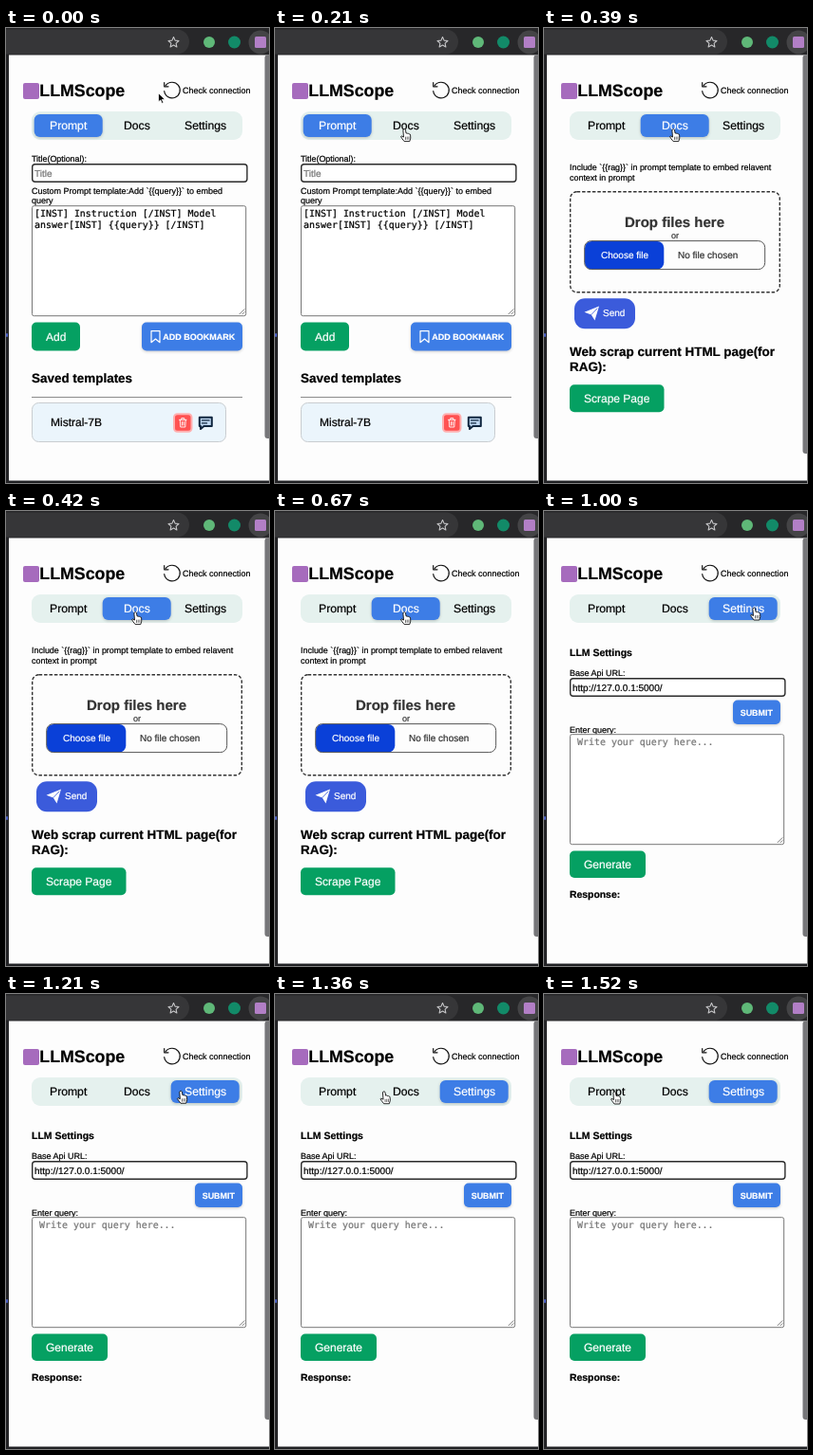
Animation, 277 px wide and 480 px high, one loop 1.55 s. Source, as an HTML page:

```html
<!DOCTYPE html>
<html>
<head>
<meta charset="utf-8">
<style>
  html, body { margin: 0; width: 100%; height: 100%; overflow: hidden; background: #202124; }
  svg { display: block; width: 100vw; height: 100vh; }
  text {
    font-family: "Liberation Sans", Arial, sans-serif;
    white-space: pre; text-rendering: geometricPrecision; stroke-width: .22;
  }
  .mono { font-family: "DejaVu Sans Mono", monospace; }
  .bold { font-weight: bold; }
  .lift { filter: drop-shadow(0 1.5px 1.5px #0003); }
</style>
</head>
<body>
<svg id="stage" viewBox="0 0 277 480"></svg>
<script>
const LOOP = 1550, DOCS_AT = 315, SETTINGS_AT = 1000;
const BLUE = '#3d7de6', GREEN = '#05a062', INK = '#000';

const box = (x, y, w, h, r, fill, extra = '') =>
  `<rect x="${x}" y="${y}" width="${w}" height="${h}" rx="${r}" fill="${fill}" ${extra}/>`;
const circle = (x, y, r, fill) => `<circle cx="${x}" cy="${y}" r="${r}" fill="${fill}"/>`;
const label = (x, y, size, str, fill = INK, cls = '') =>
  `<text x="${x}" y="${y}" font-size="${size}" fill="${fill}" stroke="${fill}" class="${cls}">${str}</text>`;
const path = (d, fill, stroke = 'none', width = 1) =>
  `<path d="${d}" fill="${fill}" stroke="${stroke}" stroke-width="${width}" stroke-linejoin="round" stroke-linecap="round"/>`;
const bold = (x, y, size, str, fill) => label(x, y, size, str, fill, 'bold');
const mono = (x, y, str, fill) => label(x, y, 9.95, str, fill, 'mono');
const button = (x, y, w, h, fill, extra) => box(x, y, w, h, 5, fill, extra);
const scrollbar = bottom => box(272.5, 28.5, 8, bottom - 28.5, 3, '#77777a');
const lift = 'class="lift"';

const field = (y, str, fill) =>
  box(27.7, y + .8, 226.2, 18.4, 3, '#fff', 'stroke="#2b2b2b" stroke-width="1.4"') +
  label(30, y + 13.6, 10, str, fill);
const textarea = y =>
  box(27.5, y + .7, 225.2, 116, 2, '#fff', 'stroke="#777"') +
  path(`M246 ${y + 114.7}l5-5M249 ${y + 114.7}l2-2`, 'none', '#555', .8);

const shell =
  box(0, 0, 277, 28.5, 0, '#272729') + box(-20, 1.5, 213, 26, 13, '#363638') +
  path('M176.500 9.500l1.600 3.600 3.900.4-2.900 2.600.8 3.900-3.400-2-3.400 2 .8-3.900-2.900-2.600 3.900-.4z', 'none', '#c6c6c8', 1.1) +
  circle(214, 15, 6, '#5fb878') + circle(240.5, 15, 6.5, '#128a68') +
  circle(268, 15, 12.5, '#444446') + box(262, 9, 12, 12, 1.5, '#b27fc6') +
  box(0, 28, 3, 452, 0, '#232326') + box(0, 322, 2, 4, 1, '#4d63c9') +
  box(3, 28.5, 274, 449, 0, '#fdfdfd') +
  box(18, 58, 17, 17, 2, '#a66bbd') +
  bold(35.3, 72.2, 17.8, 'LLMScope') +
  path('M168.200 60.700A8.300 8.300 0 1 1 166.700 66.500', 'none', '#111', 1.2) +
  path('M166.700 57.500v4.300h4.300', 'none', '#111', 1.2) +
  label(186, 69, 9, 'Check connection') +
  box(27, 88, 222, 30, 9, '#e5f1ee');

const promptPage = scrollbar(433) +
  label(27, 141, 8.9, 'Title(Optional):') + field(143, 'Title', '#757575') +
  label(27, 174.5, 9, 'Custom Prompt template:Add `{{query}}` to embed') + label(27, 185, 9, 'query') +
  textarea(187) +
  mono(30, 199, '[INST] Instruction [/INST] Model') + mono(30, 210.5, 'answer[INST] {{query}} [/INST]') +
  button(27, 310.5, 51, 30, GREEN) + label(42, 329.5, 12, 'Add', '#fff') +
  button(143, 310.5, 106, 30, BLUE, lift) +
  path('M153 319.700h9v12l-4.500-3.700-4.500 3.700z', 'none', '#fff', 1.2) +
  bold(165.3, 328.5, 9, 'ADD BOOKMARK', '#fff') +
  bold(27, 374, 13.45, 'Saved templates') + box(27, 389, 222, 1, 0, '#8b8b8b') +
  box(27.5, 395.5, 204, 41, 7, '#ebf5fc', 'stroke="#c9cdd0"') +
  label(47, 420, 12, 'Mistral-7B') +
  box(177, 407.3, 18.5, 18.5, 3.5, '#ff5252', 'stroke="#ffb0b0" stroke-width="2"') +
  path('M182.500 413.300h7.500M184.800 413v-1.400h3v1.400M183.300 413.500l.5 7.500h5l.5-7.500M185.500 415.500v3.500M187.200 415.500v3.500', 'none', '#fff', .9) +
  path('M203.800 410.700h13v9.300h-8.300l-3.500 3v-3h-1.200z', '#bfd8f2', '#10263f', 2) +
  path('M206.500 413.900h7.500M206.500 416.900h5', 'none', '#10263f', 1.4);

const docsPage = scrollbar(449) +
  label(27, 150.2, 8.93, 'Include `{{rag}}` in prompt template to embed relavent') +
  label(27, 160.5, 8.93, 'context in prompt') +
  box(27.7, 172.8, 220.6, 106, 7, 'none', 'stroke="#333" stroke-width="1.4" stroke-dasharray="3.5 1.9"') +
  bold(85, 210.3, 15, 'Drop files here', '#333') + label(134, 222, 9, 'or', '#333') +
  box(43, 225, 83.3, 29.5, 7, '#0a40d8') +
  box(42.7, 224.6, 190, 30, 7, 'none', 'stroke="#555"') +
  label(60, 243, 10, 'Choose file', '#fff') + label(141, 243, 10, 'No file chosen', '#333') +
  box(32, 285.3, 64, 32, 11, '#3b5bdb') +
  path('M42.500 299.800L58 293.500 53.500 308.500 49.800 302.500z', '#fff') +
  path('M49.800 302.500L56 296', 'none', '#3b5bdb', .8) +
  label(62, 304.3, 10, 'Send', '#fff') +
  bold(27, 346, 13.45, 'Web scrap current HTML page(for') + bold(27, 361.5, 13.45, 'RAG):') +
  button(27, 376.3, 99.5, 29, GREEN) + label(42, 394.7, 12, 'Scrape Page', '#fff');

const settingsPage = scrollbar(449) +
  bold(27, 153, 10.5, 'LLM Settings') +
  label(27, 174.3, 9, 'Base Api URL:') + field(176, 'http://127.0.0.1:5000/') +
  button(199, 199.5, 50, 25.5, BLUE, lift) + bold(206.7, 215.5, 8.95, 'SUBMIT', '#fff') +
  label(27, 233.5, 9, 'Enter query:') + textarea(235) +
  mono(35, 247, 'Write your query here...', '#757575') +
  button(27, 358.5, 80, 28.5, GREEN) + label(42, 377, 12, 'Generate', '#fff') +
  bold(27, 407.5, 10.4, 'Response:');

const tabs = [['Prompt', 46], ['Docs', 124], ['Settings', 188]];
const pages = [promptPage, docsPage, settingsPage].map((body, active) =>
  `<g class="page">${box(29.7 + 72 * active, 91, 72, 24, 6, BLUE, lift)}` +
  tabs.map(([name, x], i) => label(x, 107.2, 12.2, name, i === active ? '#fff' : INK)).join('') +
  body + '</g>');

const arrow = path('M0 0v9l2.200-2 1.600 3.500 1.600-.700-1.600-3.400h3z', '#000', '#fff', .8);
const hand =
  path('M0 .3Q1.200-.5 1.900.7L2.600 4.500Q3.700 3.700 4.200 4.800 5.300 4.200 5.800 5.300 7 5 7.100 6.500L7.300 9.500 6.300 13H.6L-2 9.600Q-3.600 7.500-2.300 7.300L0 8.500-.6 1.500z', '#fff', '#111', .9) +
  path('M2 8.500v2.500M3.700 8.400v2.500M5.400 8.300v2.500', 'none', '#111', .6);

const stage = document.getElementById('stage');
stage.innerHTML = shell + pages.join('') +
  `<g id="cursor"><g id="arrow">${arrow}</g><g id="hand">${hand}</g></g>`;
const pageNodes = [...stage.querySelectorAll('.page')];
const [cursor, arrowNode, handNode] = ['cursor', 'arrow', 'hand'].map(id => document.getElementById(id));

// time, x, y of the pointer at rest points
const stops = [[0, 160.5, 69], [190, 135.5, 106.6], [680, 135.5, 106.6], [890, 220.5, 102],
               [1060, 220.5, 102], [1520, 73.5, 103], [LOOP, 73.5, 103]];

function pointerAt(t) {
  const i = stops.findIndex(stop => stop[0] > t);
  const [t0, x0, y0] = stops[i - 1], [t1, x1, y1] = stops[i];
  const u = (t - t0) / (t1 - t0), k = u * u * (3 - 2 * u);
  return [x0 + (x1 - x0) * k, y0 + (y1 - y0) * k];
}

function show(node, on) { node.style.display = on ? '' : 'none'; }

function draw(now) {
  const t = now % LOOP;
  const active = t < DOCS_AT ? 0 : t < SETTINGS_AT ? 1 : 2;
  pageNodes.forEach((node, i) => show(node, i === active));
  const [x, y] = pointerAt(t);
  cursor.setAttribute('transform', `translate(${x} ${y})`);
  show(arrowNode, y < 91);
  show(handNode, y >= 91);
}

const start = performance.now();
function tick() {
  draw(performance.now() - start);
  requestAnimationFrame(tick);
}
tick();
</script>
</body>
</html>
```
